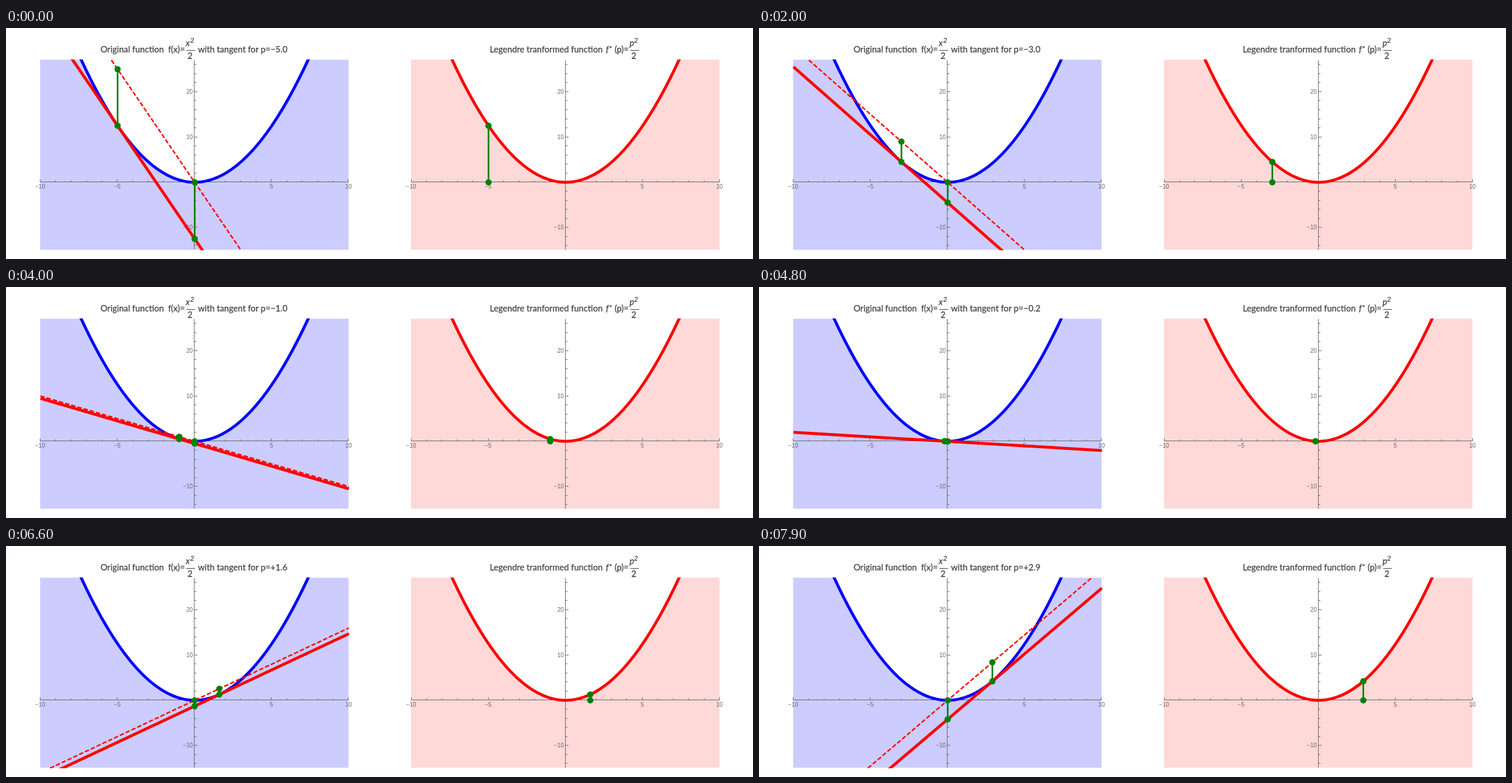
An HTML page for the animation above (8 s loop, 1280 px wide and 397 px high).

```html
<!DOCTYPE html>
<html lang="en">
<head>
<meta charset="utf-8">
<title>Legendre transform</title>
<style>
  html, body { margin: 0; width: 100%; height: 100%; overflow: hidden; background: #fff; }
  svg { display: block; width: 1280px; height: 397px; }
  .title { font: 14.7px Lato, sans-serif; fill: #404040; stroke: #404040; stroke-width: .25px; }
  .title .i { font-style: italic; }
  .title .sup { font-size: 12px; }
  .title line { stroke-width: 1; }
  .label { font: 10px "Liberation Sans", Arial, sans-serif; fill: #666; }
  .axis { stroke: #666; stroke-width: 1; shape-rendering: crispEdges; }
  .thick { fill: none; stroke-width: 5; }
  .dash { stroke-width: 2.5; stroke-dasharray: 7.5 3.5; }
  .red { stroke: #f00; }
  .blue { stroke: #00f; }
  .green { stroke: #008000; stroke-width: 2.8; }
  .dot { fill: #008000; }
</style>
</head>
<body>
<svg id="stage" viewBox="0 0 1280 397">
  <clipPath id="view"><rect x="56" y="54" width="1170" height="328"/></clipPath>
</svg>
<script>
const stage = document.getElementById('stage');
const SX = 26.42, SY = 7.775, Y0 = 264.9, TOP = 54.5, BOTTOM = 381;
const STEP = 100, STEPS = 80;

function add(parent, tag, attrs, content = '') {
  const el = document.createElementNS('http://www.w3.org/2000/svg', tag);
  set(el, attrs);
  el.textContent = content;
  return parent.appendChild(el);
}

function set(el, attrs) {
  for (const k in attrs) el.setAttribute(k, attrs[k]);
}

const py = y => Y0 - y * SY;
const minus = n => String(n).replace('-', '\u2212');

function makePlot(cx, fill, color) {
  const px = x => cx + x * SX;
  const g = add(stage, 'g', {});

  // y = x²/2 as an exact quadratic Bézier, cut at the top of the plot
  const X = Math.sqrt(54.4);
  const curve = x => `M${px(-x)} ${py(x * x / 2)}Q${px(0)} ${py(-x * x / 2)} ${px(x)} ${py(x * x / 2)}`;
  add(g, 'path', {
    d: `${curve(X)}V${TOP}H${px(10)}V${BOTTOM}H${px(-10)}V${TOP}H${px(-X)}Z`, fill
  });

  const ax = Math.floor(cx) + .5, ay = 264.5;
  const rule = (x1, y1, x2, y2) => add(g, 'line', { class: 'axis', x1, y1, x2, y2 });
  const label = (x, y, anchor, n) =>
    add(g, 'text', { class: 'label', x, y, 'text-anchor': anchor }, minus(n));
  rule(px(-10), ay, px(10), ay);
  rule(ax, TOP, ax, BOTTOM);
  for (let x = -10; x <= 10; x++) {
    const major = x % 5 === 0;
    rule(px(x), ay, px(x), ay - (major ? 5 : 3));
    if (major && x) label(px(x), 276.2, 'middle', x);
  }
  for (let y = -14; y <= 26; y += 2) {
    const major = y % 10 === 0;
    rule(ax, py(y), ax + (major ? 5 : 3), py(y));
    if (major && y) label(cx - 2.5, py(y) + 3.6, 'end', y);
  }

  // curves and markers sit on pixel centres, slightly off the axes
  const view = add(g, 'g', { 'clip-path': 'url(#view)' });
  const layer = add(view, 'g', { transform: 'translate(.6 .3)' });
  add(layer, 'path', { class: `thick ${color}`, d: curve(7.6) });

  const line = cls => {
    const el = add(layer, 'line', { class: cls });
    return (xa, ya, xb, yb) => set(el, { x1: px(xa), y1: py(ya), x2: px(xb), y2: py(yb) });
  };
  const bar = () => {
    const move = line('green');
    const dots = [0, 1].map(() => add(layer, 'circle', { class: 'dot', r: 5.4 }));
    return (x, ya, yb) => {
      move(x, ya, x, yb);
      [ya, yb].forEach((y, i) => set(dots[i], { cx: px(x), cy: py(y) }));
    };
  };
  return { line, bar };
}

function fraction(g, x, name) {
  add(g, 'text', { class: 'i', x, y: 31 }, name);
  add(g, 'text', { class: 'i sup', x: x + 7.5, y: 24.5 }, '2');
  add(g, 'line', { x1: x + 1, x2: x + 16, y1: 38.5, y2: 38.5 });
  add(g, 'text', { x: x + 3, y: 53 }, '2');
}

const left = makePlot(322.7, '#ccccff', 'blue');
const right = makePlot(958.3, '#ffd8d8', 'red');

const title = add(stage, 'g', { class: 'title' });
const text = (x, str, attrs = {}) => add(title, 'text', { x, y: 42, ...attrs }, str);
text(162, 'Original function');
text(306.5, 'f(x)=', { 'text-anchor': 'end' });
fraction(title, 308, 'x');
const caption = text(329, '');
text(829, 'Legendre tranformed function');
text(1028, 'f', { class: 'i' });
text(1033.5, '*', { class: 'sup', y: 40 });
text(1067, '(p)=', { 'text-anchor': 'end' });
fraction(title, 1068.5, 'p');

const parallel = left.line('dash red');
const tangent = left.line('thick red');
const gap = left.bar(), intercept = left.bar(), value = right.bar();

function draw(p) {
  const h = p * p / 2;
  // the dashes start at the visible left end
  const reach = p ? Math.min(10, (p < 0 ? 27 : 15) / Math.abs(p)) : 10;
  parallel(-reach, -p * reach, 10, p * 10);
  tangent(-10, -10 * p - h, 10, 10 * p - h);
  gap(p, h, 2 * h);
  intercept(0, 0, -h);
  value(p, 0, h);
  caption.textContent = `with tangent for p=${p < 0 ? '\u2212' : '+'}${Math.abs(p).toFixed(1)}`;
}

const start = performance.now();
let last = -1;
function tick() {
  const step = Math.floor((performance.now() - start) / STEP) % STEPS;
  if (step !== last) draw((step - 50) / 10);
  last = step;
  requestAnimationFrame(tick);
}
tick();
</script>
</body>
</html>
```
